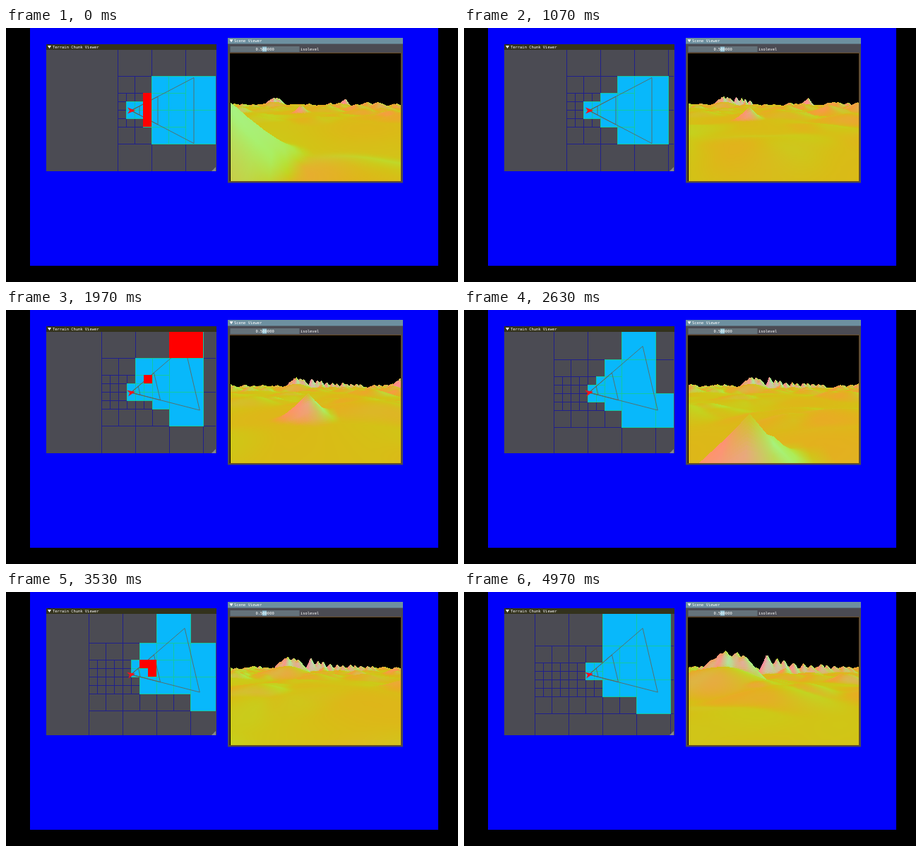
Write an HTML page with a canvas that moves like this. It is 640 px wide and 360 px high and loops after 5.01 s.

```html
<!DOCTYPE html>
<html lang="en">
<head>
<meta charset="utf-8">
<title>Terrain Chunk Viewer</title>
<style>
  html, body { margin: 0; width: 100%; height: 100%; overflow: hidden; background: #000; }
  svg, canvas { position: absolute; display: block; }
  svg { left: 0; top: 0; }
  #map { left: 57px; top: 31px; }
  #scene { left: 318px; top: 36px; }
  text { font: 5.45px "DejaVu Sans Mono", monospace; fill: #fff; }
</style>
</head>
<body>
<svg width="640" height="360" viewBox="0 0 640 360">
  <rect x="34" width="578" height="337" fill="#0000fb"/>
  <rect x="57" y="23" width="241" height="180" fill="#4b4b53"/>
  <rect x="57" y="23" width="241" height="8" fill="#33321c"/>
  <path d="M59 25h5l-2.5 4z" fill="#fff"/>
  <text x="66" y="29">Terrain Chunk Viewer</text>
  <rect x="314" y="14" width="248" height="205.500" fill="#4b4b53"/>
  <rect x="314" y="14" width="248" height="8.500" fill="#6d90a0"/>
  <path d="M316.500 16.300h5l-2.500 4z" fill="#fff"/>
  <text x="323" y="20.300">Scene Viewer</text>
  <rect x="317.500" y="26" width="98" height="8" fill="#65727a"/>
  <rect x="363" y="26.500" width="6" height="7" fill="#8fc0d2"/>
  <text x="353.500" y="32">0.500000</text>
  <text x="417" y="32">isolevel</text>
  <rect x="316.500" y="35.500" width="243" height="182" fill="#000" stroke="#6a4b22"/>
</svg>
<canvas id="map" width="240" height="172"></canvas>
<canvas id="scene" width="241" height="181"></canvas>
<script>
const LOOP = 5010, STEP = 33.4;
const TURN = 0.23, TURN_AT = 1.65, TURN_TIME = 0.3, TURNED = 1.86;
const clamp = (v, lo, hi) => Math.min(hi, Math.max(lo, v));
const lerp = (a, b, p) => a + (b - a) * p;
const smooth = p => p * p * (3 - 2 * p);
// Heading left to turn before the final course.
const headingLeft = t => TURN * (1 - smooth(clamp((t - TURN_AT) / TURN_TIME, 0, 1)));

// ---------- chunk map ----------
const map = document.getElementById('map').getContext('2d');
const CAM = { x: 177, y: 117 };
const SPLIT = { 48: 39, 24: 12 };
const SPREAD = 0.523;
// Chunks loading at start and after the turn: from, to, u, v, width, height.
const LOADING = [
  [0, 0.09, 36, 24, 12, 48],
  [1.8, 2.02, 60, 24, 12, 12],
  [1.8, 2.02, 96, -48, 48, 48]
];

function turned(x, y, a) {
  const c = Math.cos(a), s = Math.sin(a);
  return [CAM.x + x * c - y * s, CAM.y + x * s + y * c];
}

function hits(tri, x0, y0, x1, y1) {
  const xs = tri.map(p => p[0]), ys = tri.map(p => p[1]);
  if (Math.max(...xs) < x0 || Math.min(...xs) > x1) return false;
  if (Math.max(...ys) < y0 || Math.min(...ys) > y1) return false;
  const corners = [[x0, y0], [x1, y0], [x1, y1], [x0, y1]];
  return tri.every((p, i) => {
    const q = tri[(i + 1) % 3];
    return corners.some(c =>
      (q[0] - p[0]) * (c[1] - p[1]) - (q[1] - p[1]) * (c[0] - p[0]) >= 0);
  });
}

function polygon(points, color, fill) {
  map.beginPath();
  points.forEach(p => map.lineTo(p[0], p[1]));
  map.closePath();
  map.fillStyle = map.strokeStyle = color;
  if (fill) map.fill(); else map.stroke();
}

function drawMap(t) {
  const left = 157.8 - 11.66 * t;
  const top = 68 + 2.65 * Math.max(0, t - TURNED);
  const camU = CAM.x - left, camV = CAM.y - top;
  const angle = headingLeft(t) - TURN;
  const wedge = d => [-1, 1].map(side => turned(d, side * d * SPREAD, angle));
  const tri = [[CAM.x, CAM.y], ...wedge(89)];
  const hidden = [], seen = [];

  // Chunks behind the camera count as near, so they stay split.
  const distance = (u, v, size) =>
    Math.hypot(Math.max(u - camU, 0), Math.max(v - camV, camV - v - size, 0));

  function visit(u, v, size, fresh) {
    const dist = distance(u, v, size), limit = SPLIT[size];
    if (dist < limit) {
      const half = size / 2, young = dist > limit - 0.8;
      for (const i of [0, half])
        for (const j of [0, half])
          visit(u + i, v + j, half, young && distance(u + i, v + j, half) > dist);
      return;
    }
    const x = Math.round(left + u), y = Math.round(top + v);
    const loading = fresh || LOADING.some(([from, to, lu, lv, w, h]) =>
      t >= from && t < to && u >= lu && u < lu + w && v >= lv && v < lv + h);
    const list = hits(tri, left + u, top + v, left + u + size, top + v + size) ? seen : hidden;
    list.push({ x, y, size, loading });
  }

  for (let u = 0; u < 240; u += 48)
    for (let v = -48; v < 144; v += 48) visit(u, v, 48, false);

  map.setTransform(1, 0, 0, 1, -57, -31);
  map.clearRect(57, 31, 240, 172);
  const outline = (list, color) => list.forEach(b => {
    map.strokeStyle = color;
    map.strokeRect(b.x + 0.5, b.y + 0.5, b.size, b.size);
  });
  const paint = (list, color) => list.forEach(b => {
    map.fillStyle = color;
    map.fillRect(b.x, b.y, b.size, b.size);
  });
  map.lineWidth = 1;
  outline(hidden, '#20208c');
  paint(seen, '#08b8fb');
  outline(seen, '#14c8a0');
  map.lineWidth = 0.8;
  for (const d of [12, 38, 89]) polygon([[CAM.x, CAM.y], ...wedge(d)], '#66604e');
  paint(seen.filter(b => b.loading), '#f00');
  polygon([[-5, -4.5], [6, 0], [-5, 4.5], [-2, 0]]
    .map(p => turned(p[0], p[1], angle)), '#f0141c', true);
  polygon([[297, 197], [297, 203], [291, 203]], '#85888c', true);
}

// ---------- terrain ----------
const sceneCtx = document.getElementById('scene').getContext('2d');
const W = 241, H = 181, FOCAL = 230, HORIZON = 68, EYE = 2.4;
const image = sceneCtx.createImageData(W, H);
const pixels = new Uint32Array(image.data.buffer);

// Height grid: x is sideways, y runs along the final course.
const RES = 2, X0 = -76, Y0 = -64, NX = 304, NY = 336;
const relief = new Float32Array(NX * NY);
const tint = [0, 1, 2].map(() => new Float32Array(NX * NY));

let seed = 11;
function random() {
  seed = (seed * 16807) % 2147483647;
  return seed / 2147483647;
}

function peak(px, py, h, r, profile = q => Math.pow(q, 1.4)) {
  const col = (px - X0) * RES, row = (py - Y0) * RES, reach = r * RES * 1.2;
  const bend = random() * 6;
  for (let j = Math.max(0, Math.ceil(row - reach)); j < Math.min(NY, row + reach); j++)
    for (let i = Math.max(0, Math.ceil(col - reach)); i < Math.min(NX, col + reach); i++) {
      const lobes = 1 + 0.16 * Math.sin(3 * Math.atan2(j - row, i - col) + bend);
      const q = 1 - Math.hypot(i - col, j - row) / (r * RES * lobes);
      const k = j * NX + i;
      if (q > 0) relief[k] = Math.max(relief[k], h * profile(q));
    }
}

function ridge(from, to, count, radius, heightAt) {
  for (let n = 0; n < count; n++) {
    const p = n / (count - 1);
    peak(lerp(from[0], to[0], p) + random() * 0.8 - 0.4, lerp(from[1], to[1], p) + random(),
      heightAt(p) * (0.9 + 0.16 * random()), radius);
  }
}

function scatter(count) {
  for (let n = 0; n < count; n++) {
    const x = lerp(-74, 74, random()), y = lerp(-62, 100, random());
    // Low and round beside the course, tall and pointed far from it.
    const far = clamp(Math.max((Math.abs(x + 2) - 8) / 12, (y - 26) / 10), 0, 1);
    const h = 0.2 + 0.7 * random() + 1.6 * far * random();
    peak(x, y, h, lerp(2.5, 6, random()), far < 0.5 ? smooth : undefined);
  }
}

const swell = (x, y) => 0.22 * Math.sin(x * 0.35 + 1.3 * Math.sin(y * 0.19))
  + 0.16 * Math.sin(y * 0.33 + x * 0.2 + 2);

function buildTerrain() {
  scatter(420);
  ridge([-9, 23], [-3.3, 24], 6, 3.6, p => 3.3 + 1.6 * Math.sin(Math.PI * p));
  ridge([-2, 42], [24, 51], 11, 3, p => lerp(5.5, 2.3, Math.pow(p, 0.45)));
  peak(-6, 20, 2.1, 9, smooth);
  peak(28, 18, 4.1, 4);
  peak(-0.5, -25, 1.6, 1.9);
  peak(-8, -51.7, 3.4, 4.4);

  for (let j = 0; j < NY; j++)
    for (let i = 0; i < NX; i++) relief[j * NX + i] += swell(X0 + i / RES, Y0 + j / RES);
  for (let j = 1; j < NY - 1; j++)
    for (let i = 1; i < NX - 1; i++) {
      const k = j * NX + i;
      const gx = (relief[k + 1] - relief[k - 1]) * RES * 0.8;
      const gy = (relief[k + NX] - relief[k - NX]) * RES * 0.8;
      const up = 1 / Math.hypot(1, gx, gy);
      const side = -gx * up, face = gy * up;
      tint[0][k] = clamp(212 - 52 * side + 14 * face, 0, 255);
      tint[1][k] = clamp(194 + 56 * side - 18 * face, 0, 255);
      tint[2][k] = clamp(22 + 200 * (1 - up), 0, 255);
    }
}

function drawScene(t) {
  const before = Math.max(0, 1 - t / TURNED);
  const camX = -5.3 * before;
  const camY = -12 * (4.97 - t) + 1.1 * before;
  const a = headingLeft(t), sin = Math.sin(a), cos = Math.cos(a);
  pixels.fill(0xff000000);
  for (let col = 0; col < W; col++) {
    const k = (col - W / 2 + 0.5) / FOCAL;
    const dirX = sin + cos * k, dirY = cos - sin * k;
    let low = H;
    for (let d = 1.5; d < 92 && low > 0; d += Math.max(0.05, d * 0.011)) {
      const gx = clamp((camX + dirX * d - X0) * RES, 1, NX - 3);
      const gy = clamp((camY + dirY * d - Y0) * RES, 1, NY - 3);
      const ix = gx | 0, iy = gy | 0, fx = gx - ix, fy = gy - iy;
      const n = iy * NX + ix;
      const mix = f => lerp(lerp(f[n], f[n + 1], fx), lerp(f[n + NX], f[n + NX + 1], fx), fy);
      const y = Math.max(0, Math.round(HORIZON + (EYE - mix(relief)) * FOCAL / d));
      if (y >= low) continue;
      const color = 0xff000000 | mix(tint[2]) << 16 | mix(tint[1]) << 8 | mix(tint[0]);
      while (low > y) pixels[--low * W + col] = color;
    }
  }
  sceneCtx.putImageData(image, 0, 0);
}

// ---------- playback ----------
let shown = -1;
buildTerrain();
const start = performance.now();
function frame() {
  const step = Math.floor(((performance.now() - start) % LOOP) / STEP + 0.01);
  if (step !== shown) {
    shown = step;
    const t = step * STEP / 1000;
    drawMap(t);
    drawScene(t);
  }
  requestAnimationFrame(frame);
}
frame();
</script>
</body>
</html>
```
